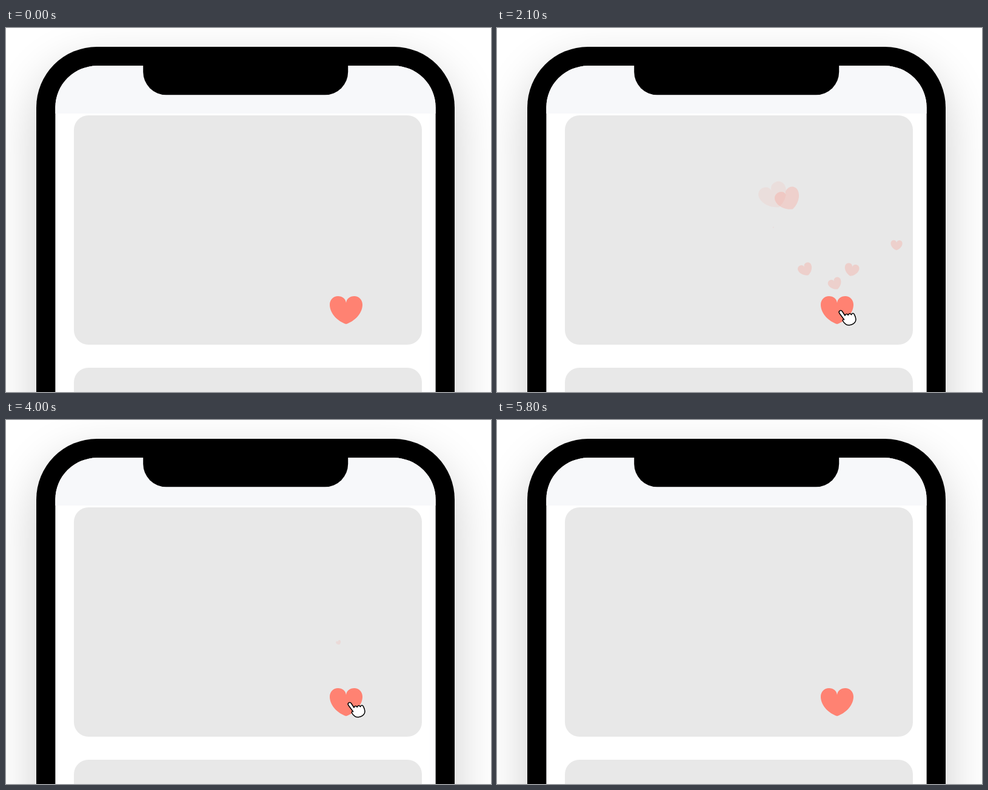
Recreate the animation shown at these times as an HTML page with a canvas. Size 800x600 px, loop 6 s.

```html
<!DOCTYPE html>
<html lang="en">
<head>
<meta charset="utf-8">
<title>Floating hearts</title>
<style>
  html, body { margin: 0; width: 100%; height: 100%; overflow: hidden; background: #fff; }
  canvas { display: block; }
</style>
</head>
<body>
<canvas id="stage" width="800" height="600"></canvas>
<script>
const ctx = document.getElementById('stage').getContext('2d');
const LOOP = 6000, STEP = 100, LIFE = 450;
const CORAL = '#ff8272', CARD = '#e8e8e8';
const BEZEL = 31.36;

const heartPath = new Path2D(
  'M0-12C1-19 6-23 13.5-23C21-23 27-17 27-9C27 6 13 19 0 23' +
  'C-13 19-27 6-27-9C-27-17-21-23-13.5-23C-6-23-1-19 0-12Z');
const handPath = new Path2D(
  'M564.8 470.2C562.6 466.6 567 463.8 569.4 467L574 474' +
  'C574.8 471 578 470.8 579.2 473.4C580 470 583.3 469.9 584.5 472.8' +
  'C585.6 469.2 588.6 469.8 589.5 472.4L591.2 476.4' +
  'C592.8 481 591.4 485 587.6 487.6C584 490 578.6 490.6 575.4 488.4' +
  'C573.2 486.6 570.8 483.6 570.2 482.2C569.8 480.6 571.6 480 572.6 480.8Z');

// Each track: start, end, optional bend, final width, tilt in degrees, opacity left at the end, birth times.
const tracks = [
  { from: [539, 437], to: [487, 370], size: 41, tilt: -25,
    births: [800, 1000, 1118, 1376, 1560, 1841, 2200, 2500, 3250, 4120] },
  { from: [570, 440], to: [596, 368], size: 42, tilt: 13,
    births: [820, 1000, 1125, 1243, 1843, 2200, 2450, 3250, 3400, 4050] },
  { from: [588, 443], to: [658, 390], size: 46, tilt: 16,
    births: [1392, 2800, 4120, 5300] },
  { from: [615, 402], to: [663, 354], size: 21, tilt: 2,
    births: [1000, 1688, 2450, 2885, 3300] },
  { from: [566, 365], to: [651, 305], size: 20, tilt: 3,
    births: [1230, 2300, 3400, 4650] },
  { from: [465, 341], to: [406, 262], size: 13, tilt: -38,
    births: [1223, 2030, 2700, 4100] },
  { from: [563, 448], to: [554, 401], size: 40, tilt: -25,
    births: [800, 1550, 1850, 2250, 3350, 4100] },
  { from: [550, 402], to: [457, 277], bend: [555, 293], size: 47, tilt: -25, fade: 0.38,
    births: [720, 1000, 1650, 1708, 2260, 2700, 2995, 3922, 4550, 5250] },
];

const clamp = v => Math.max(0, Math.min(1, v));
const easeOut = p => 1 - (1 - p) ** 3;

function box(x, y, w, h, r, color) {
  ctx.beginPath();
  ctx.roundRect(x, y, w, h, r);
  ctx.fillStyle = color;
  ctx.fill();
}

function drawHeart(x, y, width, tilt, alpha) {
  ctx.save();
  ctx.translate(x, y);
  ctx.rotate(tilt * Math.PI / 180);
  ctx.scale(width / 54, width / 54);
  ctx.globalAlpha = alpha;
  ctx.fillStyle = CORAL;
  ctx.fill(heartPath);
  ctx.restore();
}

function drawPhone() {
  ctx.fillStyle = '#fff';
  ctx.fillRect(0, 0, 800, 600);
  ctx.save();
  ctx.shadowColor = 'rgba(0,0,0,.2)';
  ctx.shadowBlur = 80;
  ctx.shadowOffsetY = 30;
  box(50, 31, 690, 1300, 100, '#000');
  ctx.restore();

  ctx.save();
  ctx.beginPath();
  ctx.roundRect(50 + BEZEL, 31 + BEZEL, 690 - 2 * BEZEL, 1200, 100 - BEZEL);
  ctx.clip();
  ctx.fillStyle = '#fcfcfd';
  ctx.fillRect(81, 62, 628, 538);
  ctx.fillStyle = '#f7f8fa';
  ctx.fillRect(81, 62, 628, 79);
  ctx.fillStyle = '#fff';
  ctx.fillRect(85, 141, 614, 459);
  ctx.restore();

  box(226.2, 50, 338, 60.3, [0, 0, 38, 38], '#000');
  box(112, 144, 574, 378, 24, CARD);
  box(112, 560, 574, 378, 24, CARD);
}

function drawTrack(track, time) {
  const { from, to, size, tilt, births, fade = 0.75 } = track;
  const bend = track.bend || from.map((v, i) => (v + to[i]) / 2);
  for (const birth of births) {
    const p = (time - birth) / LIFE;
    if (p <= 0 || p > 1) continue;
    const q = 1 - p;
    const [x, y] = from.map((v, i) => q * q * v + 2 * q * p * bend[i] + p * p * to[i]);
    const leaving = clamp((p - 0.85) / 0.15);
    const alpha = 0.26 * clamp(0.35 + p) * (1 - (1 - fade) * leaving);
    drawHeart(x, y, size * p, tilt, alpha);
  }
}

function drawHand(time) {
  if (time < 500 || time >= 5800) return;
  const entering = 1 - easeOut(clamp((time - 500) / 300));
  const leaving = clamp((time - 5300) / 400) ** 2 * 0.65;
  const away = Math.max(entering, leaving);
  ctx.save();
  ctx.translate(103 * away, 104 * away);
  ctx.fillStyle = '#fff';
  ctx.strokeStyle = '#000';
  ctx.lineWidth = 1.5;
  ctx.lineJoin = 'round';
  ctx.fill(handPath);
  ctx.stroke(handPath);
  ctx.restore();
}

function draw(now) {
  const time = Math.floor((now % LOOP) / STEP) * STEP;
  drawPhone();
  for (const track of tracks) drawTrack(track, time);
  drawHeart(561, 465, 54, 0, 1);
  drawHand(time);
}

let start;
function tick(now) {
  start ??= now;
  draw(now - start);
  requestAnimationFrame(tick);
}
draw(0);
requestAnimationFrame(tick);
</script>
</body>
</html>
```
